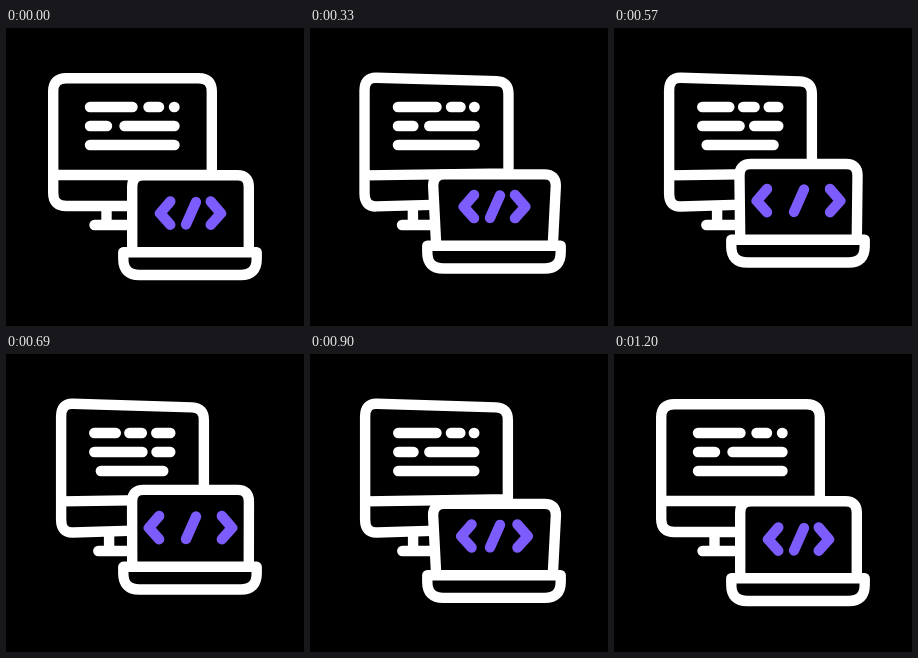
An HTML page that plays this animation: 298 px wide and 298 px high, repeating every 1470 ms.

```html
<!DOCTYPE html>
<html lang="en">
<head>
<meta charset="utf-8">
<title>Code on two screens</title>
<style>
  html, body { margin: 0; width: 100%; height: 100%; overflow: hidden; background: #000; }
  svg { display: block; width: 100%; height: 100%; }
  path { fill: none; stroke: #fff; stroke-width: 10.4; stroke-linecap: round; stroke-linejoin: round; }
  .solid { fill: #000; }
  #code { stroke: #7c5cfc; }
</style>
</head>
<body>
<svg viewBox="0 0 298 298">
  <path id="stand"/>
  <path id="monitor" class="solid"/>
  <path id="lines"/>
  <path id="lid" class="solid"/>
  <path id="base" class="solid" d="M117.3 224.3H250.7V231Q250.7 247 234.7 247H133.3Q117.3 247 117.3 231Z"/>
  <path id="code"/>
</svg>
<script>
const LOOP = 1470, STEP = 30;
const el = id => document.getElementById(id);
const draw = (id, d) => el(id).setAttribute('d', d);
const mix = (a, b, k) => a + (b - a) * k;

// Eased 0..1 ramp between two times
const ramp = (t, a, b) => {
  const k = Math.min(1, Math.max(0, (t - a) / (b - a)));
  return (1 - Math.cos(Math.PI * k)) / 2;
};
// Up from a to b, hold, down from c to d
const bump = (t, a, b, c, d) => ramp(t, a, b) - ramp(t, c, d);

const MID = 126.5;
const squeeze = (x, turn) => MID + (x - MID) * (1 - 0.1 * turn);

function drawMonitor(turn) {
  const p = (x, y) => {
    const u = (x - MID) / 84.5;
    const scale = 1 - turn * (0.021 + 0.036 * u);
    return squeeze(x, turn).toFixed(2) + ' ' + (115 + (y - 115) * scale).toFixed(2) + ' ';
  };
  const l = 47.2, r = 205.8, top = 50.2, low = 178, c = 13;
  draw('monitor',
    'M' + p(l + c, top) + 'L' + p(r - c, top) + 'Q' + p(r, top) + p(r, top + c) +
    'L' + p(r, low - c) + 'Q' + p(r, low) + p(r - c, low) +
    'L' + p(l + c, low) + 'Q' + p(l, low) + p(l, low - c) +
    'L' + p(l, top + c) + 'Q' + p(l, top) + p(l + c, top) + 'Z' +
    'M' + p(l, 147) + 'L' + p(r, 147));
  const x = v => squeeze(v, turn);
  draw('stand', `M${x(100.5)} 180V197M${x(88.5)} 197H${x(126)}`);
}

// Text dashes as [y, start, end, start after edit, end after edit]
const DASHES = [
  [79, 84, 126.5, 84, 107.5], [79, 142.5, 153, 122.5, 136.5], [79, 168, 168.5, 152.5, 168.5],
  [98, 84, 101, 84, 138.5], [98, 118.5, 168.5, 154, 168.5],
  [117, 84, 168.5, 91.5, 160.5]
];
function drawLines(turn, edit) {
  draw('lines', DASHES.map(([y, a, b, a2, b2]) =>
    `M${squeeze(mix(a, a2, edit), turn)} ${y}H${squeeze(mix(b, b2, edit), turn)}`).join(''));
}

function drawLaptop(lift, tilt, spread) {
  const w = 3.2 * tilt, l = 126.2 - w, r = 242.8 + w;
  const top = 147.2 + 6 * tilt, c = 11.5;
  draw('lid', `M126.2 224L${l} ${top + c}Q${l} ${top} ${l + c} ${top}` +
    `H${r - c}Q${r} ${top} ${r} ${top + c}L242.8 224`);
  const a = 164.3 - spread, b = 204.7 + spread;
  draw('code', `M${a} 173.5l-10.3 11.8l10.3 11.4M190 174L180 196.5` +
    `M${b} 173.5l10.3 11.8l-10.3 11.4`);
  for (const id of ['lid', 'base', 'code'])
    el(id).setAttribute('transform', `translate(0 ${-lift})`);
}

function frame(now) {
  const t = Math.floor((now % LOOP) / STEP) * STEP;
  const turn = bump(t, 75, 385, 945, 1205);
  drawMonitor(turn);
  drawLines(turn, bump(t, 450, 650, 670, 870));
  drawLaptop(
    12.5 * bump(t, 75, 570, 610, 1045),
    bump(t, 75, 375, 375, 660) + bump(t, 660, 930, 930, 1205),
    12 * bump(t, 300, 620, 620, 1030));
  requestAnimationFrame(frame);
}
frame(0);
</script>
</body>
</html>
```
